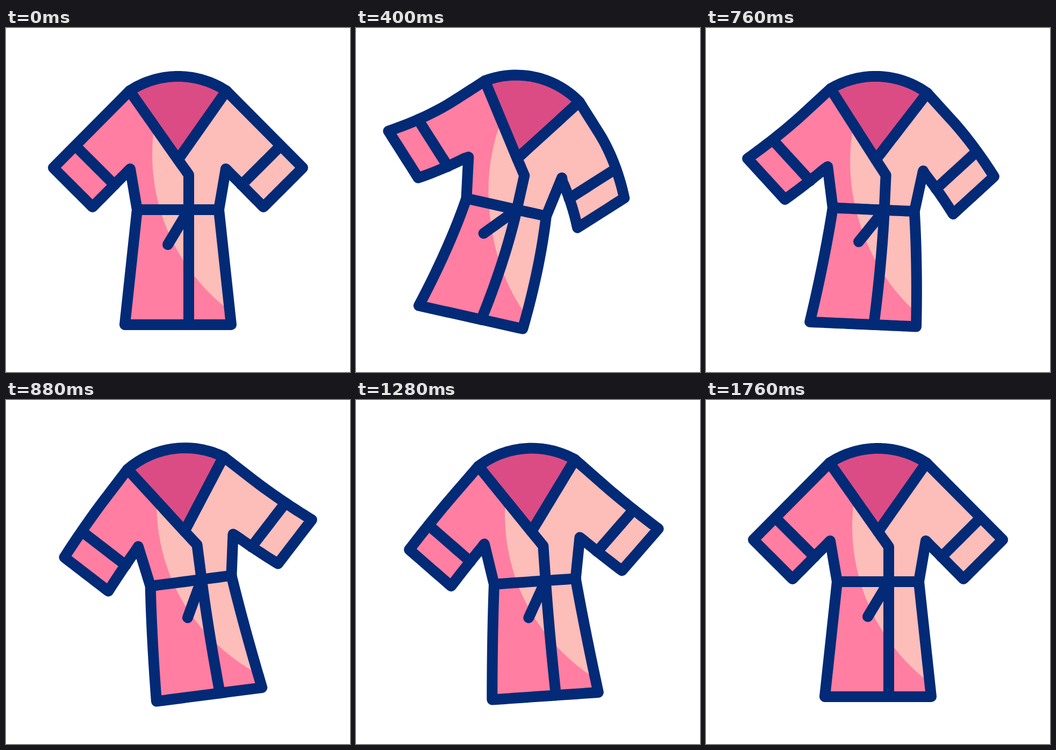
Write an HTML page that moves like this. It is 640 by 640 pixels and loops after 1880 ms.

```html
<!DOCTYPE html>
<html lang="en">
<head>
<meta charset="utf-8">
<title>Swinging bathrobe</title>
<style>
  html, body { margin: 0; width: 100%; height: 100%; overflow: hidden; background: #fff; }
  svg { display: block; width: 100vw; height: 100vh; }
  .line { fill: none; stroke: #032a76; stroke-width: 20; stroke-linecap: round; stroke-linejoin: round; }
</style>
</head>
<body>
<svg id="stage" viewBox="0 0 640 640"></svg>
<script>
const LOOP = 1880, STEP = 40, RAD = Math.PI / 180;
const PIVOT = [320, 152];

// [time in ms, value], eased between keys
const SWING = [[90, 0], [545, 16.5], [960, -10], [1520, 0]];
const BEND = [[190, 0], [430, 21], [610, 21], [1080, -24], [1430, 8], [1755, 0]];

function track(keys, t) {
  if (t <= keys[0][0]) return keys[0][1];
  for (let i = 1; i < keys.length; i++) {
    const [t0, a] = keys[i - 1], [t1, b] = keys[i];
    if (t <= t1) {
      const u = (t - t0) / (t1 - t0);
      return a + (b - a) * u * u * (3 - 2 * u);
    }
  }
  return keys[keys.length - 1][1];
}

const mirror = pts => pts.map(([x, y]) => [640 - x, y]);

function arc(cx, cy, r, from, to, n = 30) {
  return Array.from({ length: n + 1 }, (_, i) => {
    const a = (from + (to - from) * i / n) * RAD;
    return [cx + r * Math.cos(a), cy + r * Math.sin(a)];
  });
}

// Splits long segments so that they can bend
function split(pts) {
  const out = [pts[0]];
  for (let i = 1; i < pts.length; i++) {
    const [x0, y0] = pts[i - 1], [x1, y1] = pts[i];
    const n = Math.max(1, Math.ceil(Math.hypot(x1 - x0, y1 - y0) / 8));
    for (let k = 1; k <= n; k++) out.push([x0 + (x1 - x0) * k / n, y0 + (y1 - y0) * k / n]);
  }
  return out;
}

const side = [[230, 117], [88, 260], [161, 333], [231, 262], [244, 338], [221, 552]];
const otherSide = mirror(side);
const collar = arc(320, 253.5, 163.5, -123.4, -56.6);
const body = [...side, ...otherSide.slice().reverse(), ...collar.slice().reverse()];
const neck = [...collar, [320, 245], [230, 117]];
const light = [
  [275, 181], [320, 245], ...otherSide.slice(0, 5), [416.5, 526],
  ...arc(638, 235, 366, 127.2, 188.5)
];
const cuff = [[129, 219], [202, 292]];

const shapes = [
  { pts: body, fill: "#ff7ea1" },
  { pts: light, fill: "#fdbdb9" },
  { pts: neck, fill: "#db4c85" },
  { pts: [...body, body[0]], closed: true },
  { pts: [[230, 117], [320, 245], [340, 273], [340, 552]] },
  { pts: [[410, 117], [320, 245]] },
  { pts: [[244, 338], [396, 338]] },
  { pts: cuff },
  { pts: mirror(cuff) },
  { pts: [[340, 338], [301, 403]], tail: true }
];

const stage = document.getElementById("stage");
for (const s of shapes) {
  s.pts = split(s.pts);
  s.el = document.createElementNS("http://www.w3.org/2000/svg", "path");
  if (s.fill) s.el.setAttribute("fill", s.fill);
  else s.el.setAttribute("class", "line");
  stage.appendChild(s.el);
}

function turn([x, y], [cx, cy], deg) {
  const c = Math.cos(deg * RAD), s = Math.sin(deg * RAD);
  x -= cx;
  y -= cy;
  return [cx + x * c - y * s, cy + x * s + y * c];
}

function flex([x, y], bend) {
  if (y > 338) return [x - bend * ((y - 338) / 214) ** 1.8, y];
  const left = x < 231;
  if (!left && x <= 409) return [x, y];
  const out = left ? 230 - x : x - 410;
  const reach = Math.max(0, ((out + y - 117) * Math.SQRT1_2 - 70) / 131) ** 1.8;
  if (left) {
    const lift = 0.9 * bend * reach * Math.SQRT1_2;
    return [x - lift, y - lift];
  }
  const drop = 1.22 * bend * reach * Math.SQRT1_2;
  const pull = 0.28 * Math.max(0, bend) * reach * Math.SQRT1_2;
  return [x - drop - pull, y + drop - pull];
}

function draw(t) {
  const angle = track(SWING, t), bend = track(BEND, t);
  for (const s of shapes) {
    const d = s.pts.map(p => {
      const q = s.tail ? turn(p, [340, 338], bend * 0.54) : flex(p, bend);
      return turn(q, PIVOT, angle).map(v => v.toFixed(2)).join(" ");
    }).join("L");
    s.el.setAttribute("d", "M" + d + (s.fill || s.closed ? "Z" : ""));
  }
}

function tick() {
  const t = performance.now() % LOOP;
  draw(Math.floor(t / STEP) * STEP);
  requestAnimationFrame(tick);
}
draw(0);
requestAnimationFrame(tick);
</script>
</body>
</html>
```
